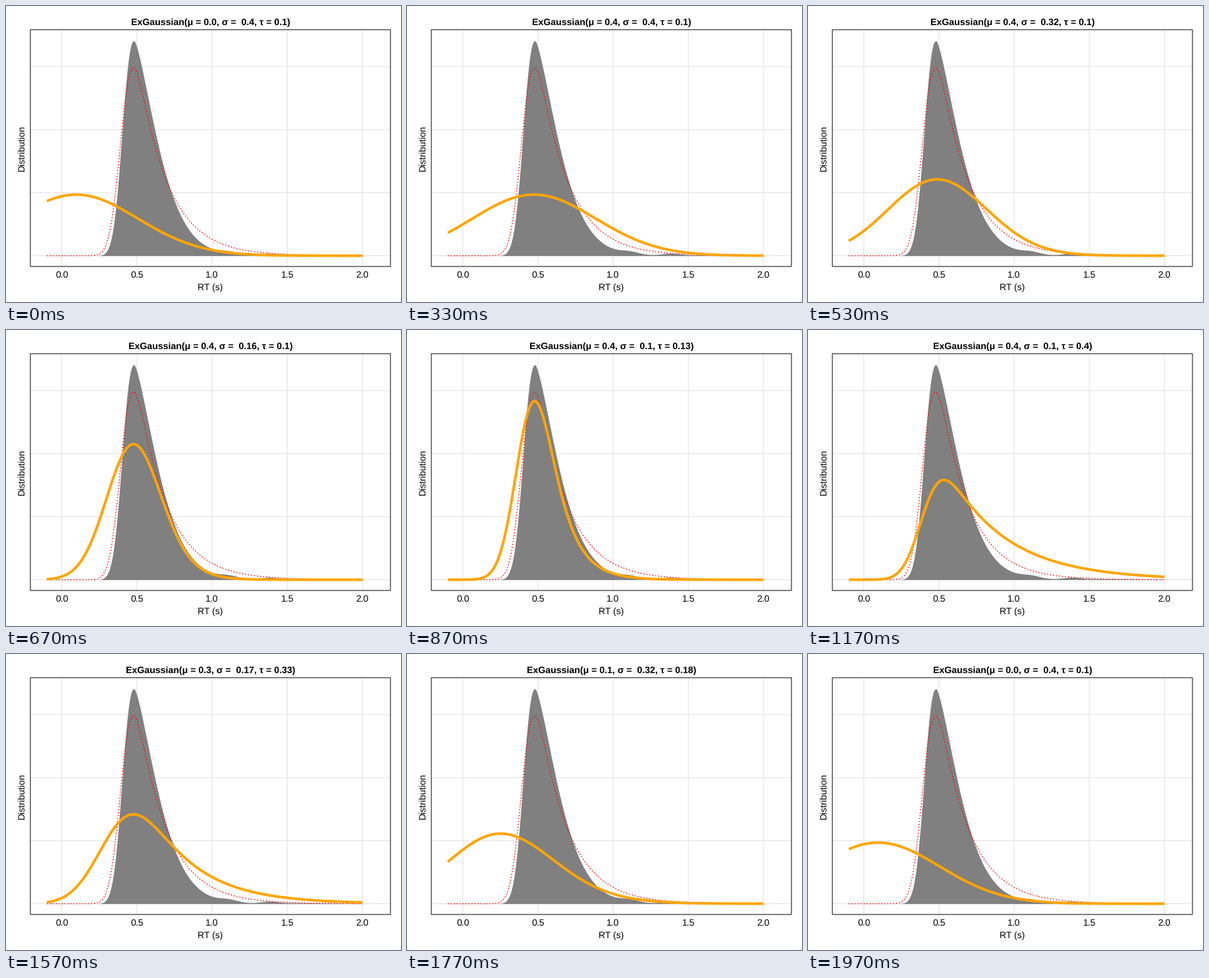
Write a matplotlib script that moves like this. It is 600 by 450 pixels and loops after 2010 ms.

```python
import math

import matplotlib.pyplot as plt
import numpy as np
from matplotlib.animation import FuncAnimation

plt.rcParams["font.family"] = "Liberation Sans"
plt.rcParams["text.hinting"] = "none"

W, H, DPI = 600, 450, 100
PT = 72 / DPI
LEFT, RIGHT, TOP, BOTTOM = 37, 584, 36, 396
X0, X_UNIT = 84.8, 228.3
Y0, Y_UNIT = 379.64, 95.85
STEPS = 60

erfc = np.vectorize(math.erfc)


def px(x):
    return X0 + X_UNIT * x


def py(y):
    return Y0 - Y_UNIT * y


def exgauss(x, mu, sigma, tau):
    rate = np.exp((mu - x) / tau + sigma**2 / (2 * tau**2)) / tau
    z = (x - mu) / sigma - sigma / tau
    return rate * 0.5 * erfc(-z / math.sqrt(2))


def observed(x):
    """Skewed bell with a steep left side and a slightly bumpy tail."""
    u = x - 0.481
    left = np.abs(u / 0.1025) ** 2.35
    right = np.abs(u / 0.215) ** 1.41
    y = 3.41 * np.exp(-np.where(u < 0, left, right))
    for center, height, width in [(1.11, 0.042, 0.065),
                                  (1.38, 0.030, 0.06),
                                  (1.60, 0.012, 0.2)]:
        y += height * np.exp(-((x - center) / width) ** 2 / 2)
    return y


def ease(t, start, stop, a, b):
    p = min(max((t - start) / (stop - start), 0), 1)
    return a + (b - a) * (1 - math.cos(math.pi * p)) / 2


def params(step):
    """Mu, sigma and tau change one after another, then return together."""
    def at(last):
        return min(step, last) / (STEPS - 1)

    t = step / (STEPS - 1)
    if t >= 0.7:
        return (ease(t, 0.7, 1, 0.4, 0.0),
                ease(t, 0.7, 1, 0.1, 0.4),
                ease(t, 0.7, 1, 0.4, 0.1))
    return (ease(at(11), 0, 0.2, 0.0, 0.4),
            ease(at(23), 0.2, 0.4, 0.4, 0.1),
            ease(at(35), 0.4, 0.6, 0.1, 0.4))


fig = plt.figure(figsize=(W / DPI, H / DPI), dpi=DPI, facecolor="white")
ax = fig.add_axes([0, 0, 1, 1])
ax.set_xlim(0, W)
ax.set_ylim(H, 0)
ax.axis("off")


def stroke(x, y, color, width, **kw):
    return ax.plot(x, y, color=color, lw=width * PT, snap=False,
                   solid_capstyle="butt", **kw)[0]


def label(x, y, text, size=14, **kw):
    return ax.text(x, y, text, fontsize=size * PT, color="black",
                   ha="center", va="baseline", **kw)


for tick in np.arange(0, 2.1, 0.5):
    stroke([px(tick)] * 2, [TOP, BOTTOM], "#e0e0e0", 1, zorder=1)
    label(px(tick), 412.5, f"{tick:.1f}")
for tick in range(4):
    stroke([LEFT, RIGHT], [py(tick)] * 2, "#e0e0e0", 1, zorder=1)

xs = np.linspace(0.13, 2.02, 800)
ax.fill_between(px(xs), py(observed(xs)), Y0, color="#808080", lw=0, zorder=2)

grid = np.linspace(-0.1, 2, 400)
stroke(px(grid), py(exgauss(grid, 0.4, 0.06, 0.2)), "red", 1.5,
       linestyle=(0, (1, 2)), zorder=3)
curve = stroke(px(grid), px(grid), "orange", 4, zorder=4,
               solid_joinstyle="round")
ax.add_patch(plt.Rectangle((LEFT, TOP), RIGHT - LEFT, BOTTOM - TOP,
                           fill=False, ec="black", lw=PT, snap=False,
                           joinstyle="miter", zorder=5))

title = label((LEFT + RIGHT) / 2, 28.8, "", size=14.17, fontweight="bold")
label((LEFT + RIGHT) / 2, 431.8, "RT (s)")
label(27.6, (TOP + BOTTOM) / 2, "Distribution", rotation=90,
      rotation_mode="anchor")


def update(i):
    # 30 steps per second, sampled on a 10 ms clock
    step = min((6 * i + 3) // 20, STEPS - 1)
    mu, sigma, tau = params(step)
    curve.set_ydata(py(exgauss(grid, mu, sigma, tau)))
    title.set_text(f"ExGaussian(μ = {round(mu, 1)}, σ =  {round(sigma, 2)}, "
                   f"τ = {round(tau, 2)})")
    return curve, title


anim = FuncAnimation(fig, update, frames=201, interval=10, repeat=True,
                     repeat_delay=0, blit=False)
plt.show()
```
